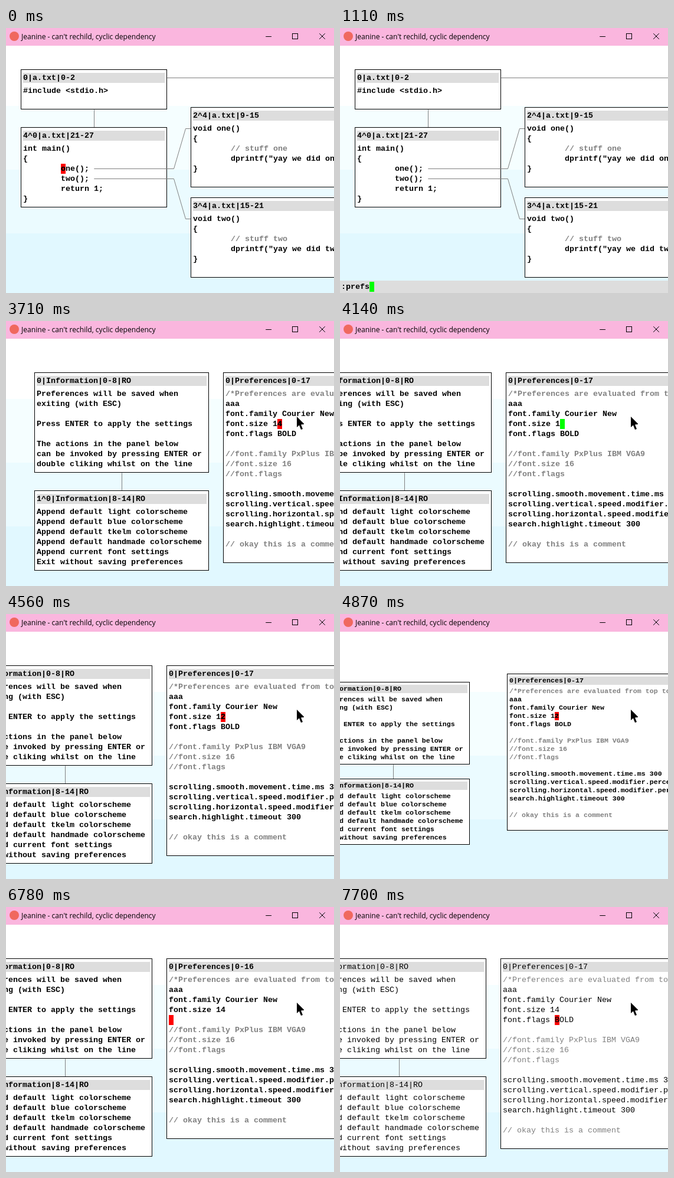
Animation, 556 px wide and 449 px high, one loop 8000 ms. Source, as an HTML page with a canvas:

```html
<!DOCTYPE html>
<html lang="en">
<head>
<meta charset="utf-8">
<title>Panel editor preferences</title>
<style>
  html, body { margin: 0; width: 100%; height: 100%; overflow: hidden; background: #fff; }
  canvas { display: block; }
</style>
</head>
<body>
<canvas id="stage" width="556" height="449"></canvas>
<script>
const ctx = document.getElementById('stage').getContext('2d');
const LOOP = 8000, W = 556;
const RED = '#f00', GREEN = '#0f0', GRAY = '#808080', HEADER = '#ddd';

// Cell metrics and panel padding for the two font sizes
const LARGE = { cw: 8, lh: 17, base: 12, pad: 6, gap: 5 };
const SMALL = { cw: 7, lh: 14, base: 10, pad: 5, gap: 4 };

const INFO = `Preferences will be saved when
exiting (with ESC)

Press ENTER to apply the settings

The actions in the panel below
can be invoked by pressing ENTER or
double cliking whilst on the line`.split('\n');

const ACTIONS = `Append default light colorscheme
Append default blue colorscheme
Append default tkelm colorscheme
Append default handmade colorscheme
Append current font settings
Exit without saving preferences`.split('\n');

const prefLines = (size, hasFlags) => [
  '/*Preferences are evaluated from top to bottom*/',
  'aaa',
  'font.family Courier New',
  'font.size ' + size,
  ...(hasFlags ? ['font.flags BOLD'] : []),
  '',
  '//font.family PxPlus IBM VGA9',
  '//font.size 16',
  '//font.flags',
  '',
  'scrolling.smooth.movement.time.ms 300',
  'scrolling.vertical.speed.modifier.percent 100',
  'scrolling.horizontal.speed.modifier.percent 100',
  'search.highlight.timeout 300',
  '',
  '// okay this is a comment',
  ''
];

const routine = name => [
  `void ${name}()`, '{', `        // stuff ${name}`,
  `        dprintf("yay we did ${name}\\n");`, '}', ''
];

// Steps: [time, ...values]
const CURSOR = [
  [0, 0, 0, RED], [3710, 3, 11, RED], [3960, 3, 11, GREEN], [4500, 3, 12, GREEN],
  [4560, 3, 11, RED], [5620, 3, 11, GREEN], [5930, 3, 12, GREEN], [6160, 3, 11, RED],
  [6530, 4, 11, RED], [6780, 4, 0, RED], [7700, 4, 11, RED]
];
const SIZE = [[0, '14'], [3960, '1'], [4500, '12'], [5620, '1'], [5930, '14']];
const COMMAND = [[500, ''], [750, 'p'], [810, 'pr'], [870, 'pre'], [1050, 'pref'], [1110, 'prefs']];

const stepAt = (steps, t) => steps.filter(s => s[0] <= t).pop().slice(1);
const progress = (t, from, to) => Math.min(1, Math.max(0, (t - from) / (to - from)));

function rect(x, y, w, h, color) {
  ctx.fillStyle = color;
  ctx.fillRect(x, y, w, h);
}

// Joins pixel centres, end pixels included
function stroke(color, ...points) {
  ctx.strokeStyle = color;
  ctx.lineWidth = 1;
  ctx.lineCap = 'square';
  ctx.beginPath();
  points.forEach(([x, y]) => ctx.lineTo(x + .5, y + .5));
  ctx.stroke();
}

function text(str, x, y, m, bold = true, color = '#000') {
  ctx.font = `${bold ? 'bold ' : ''}${m.cw / .6001}px "Liberation Mono", monospace`;
  ctx.fillStyle = color;
  ctx.fillText(str, x, y + m.base);
}

function panel({ x, y, w, title, lines, m = LARGE, bold = true, cursor }) {
  const top = y + m.pad + m.lh + m.gap;
  const h = top - y + lines.length * m.lh + m.pad;
  rect(x, y, w, h, '#000');
  rect(x + 1, y + 1, w - 2, h - 2, '#fff');
  rect(x + 4, y + m.pad, w - 8, m.lh, HEADER);
  text(title, x + 4, y + m.pad, m, bold);
  if (cursor) {
    const [row, col, color] = cursor;
    rect(x + 4 + col * m.cw, top + row * m.lh, m.cw, m.lh, color);
  }
  lines.forEach((line, i) => {
    const color = /^\s*\/[/*]/.test(line) ? GRAY : '#000';
    text(line, x + 4, top + i * m.lh, m, bold, color);
  });
  if (cursor) {
    const [row, col] = cursor;
    text(lines[row][col] || '', x + 4 + col * m.cw, top + row * m.lh, m, bold);
  }
}

function background() {
  ['#fff', '#f5feff', '#ebfbff', '#e1f8ff'].forEach((color, i) =>
    rect(0, 24 + i * 108, W, 120, color));
}

function titleBar() {
  rect(0, 0, W, 30, '#fab6de');
  ctx.fillStyle = '#f0685f';
  ctx.beginPath();
  ctx.arc(14, 14, 8, 0, 7);
  ctx.fill();
  ctx.font = '12.1px "Open Sans", sans-serif';
  ctx.fillStyle = '#000';
  ctx.fillText("Jeanine - can't rechild, cyclic dependency", 26, 19);
  stroke('#000', [440, 14], [449, 14]);
  ctx.strokeRect(485.5, 9.5, 9, 9);
  stroke('#000', [531, 9], [540, 18]);
  stroke('#000', [540, 9], [531, 18]);
}

function codeScene(t) {
  stroke(GRAY, [273, 84], [W, 84]);
  stroke(GRAY, [149, 138], [149, 168]);
  panel({ x: 25, y: 70, w: 248, title: '0|a.txt|0-2', lines: ['#include <stdio.h>', ''] });
  panel({
    x: 25, y: 168, w: 248, title: '4^0|a.txt|21-27',
    lines: ['int main()', '{', '        one();', '        two();', '        return 1;', '}'],
    cursor: t < 500 && [2, 8, RED]
  });
  panel({ x: 313, y: 134, w: 400, title: '2^4|a.txt|9-15', lines: routine('one') });
  panel({ x: 313, y: 287, w: 400, title: '3^4|a.txt|15-21', lines: routine('two') });
  stroke(GRAY, [149, 238], [284, 238], [304, 170], [312, 170]);
  stroke(GRAY, [149, 255], [284, 255], [304, 323], [312, 323]);
  if (t >= 500) {
    const [typed] = stepAt(COMMAND, t);
    rect(0, 428, W, 21, HEADER);
    text(':' + typed, 2, 430, LARGE);
    rect(10 + typed.length * 8, 430, 8, 17, GREEN);
  }
}

// Horizontal scroll that keeps the insert cursor in view
function scrollAt(t) {
  if (t < 3960) return 0;
  if (t < 4260) return Math.floor(88 * (1 - Math.exp((3960 - t) / 40)));
  return t < 4500 ? 88 : t < 4560 ? 92 : 96;
}

function preferencesScene(t) {
  const small = t >= 4870 && t < 6280;
  const hasFlags = t < 6780 || t >= 7700;
  const style = { m: small ? SMALL : LARGE, bold: t < 6900 };
  const scroll = scrollAt(t);
  const left = small
    ? { x: -40, w: 260, y: 115, bottom: 255, next: 279 }
    : { x: 48 - scroll, w: 296, y: 87, bottom: 257, next: 287 };
  const mid = left.x + left.w / 2;

  stroke(GRAY, [mid, left.bottom], [mid, left.next]);
  panel({ ...style, x: left.x, y: left.y, w: left.w, title: '0|Information|0-8|RO', lines: INFO });
  panel({ ...style, x: left.x, y: left.next, w: left.w, title: '1^0|Information|8-14|RO', lines: ACTIONS });
  panel({
    ...style, x: small ? 283 : 368 - scroll, y: small ? 101 : 87, w: 500,
    title: '0|Preferences|0-' + (hasFlags ? 17 : 16),
    lines: prefLines(stepAt(SIZE, t)[0], hasFlags),
    cursor: stepAt(CURSOR, t)
  });
  if (t >= 2310) pointer(t);
}

function pointer(t) {
  const enter = 1 - (1 - progress(t, 2310, 2590)) ** 2;
  const p = progress(t, 2920, 3650);
  const move = p * p * (3 - 2 * p);
  const x = Math.round(328 - 84 * enter + 249 * move);
  const y = Math.round(442 - 220 * enter - 59 * move);
  ctx.fillStyle = '#000';
  ctx.beginPath();
  [[0, -1], [0, 17], [4, 13.5], [7, 21], [10, 20], [7, 12.5], [12, 12], [12, 11]]
    .forEach(([dx, dy]) => ctx.lineTo(x + dx, y + dy));
  ctx.fill();
}

function draw(now) {
  const t = now % LOOP;
  background();
  if (t < 1360) codeScene(t);
  else preferencesScene(t);
  titleBar();
  requestAnimationFrame(draw);
}
requestAnimationFrame(draw);
</script>
</body>
</html>
```
